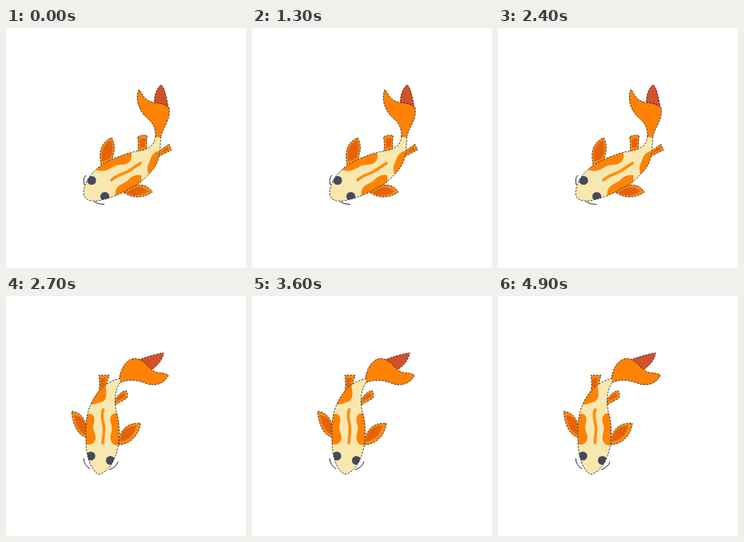
These frames come from a looping animation (300x300 px, 5 s). An HTML page:

```html
<!DOCTYPE html>
<html lang="en">
<head>
<meta charset="utf-8">
<title>Swimming koi</title>
<style>
  html, body { margin: 0; width: 100%; height: 100%; overflow: hidden; background: #fff; }
  svg { display: block; width: 100%; height: 100%; }
  .line, .lobe, .tail, .fin { stroke: #111; stroke-width: .8; stroke-dasharray: 2.4 1.6; }
  .line, .whisker { fill: none; }
  .whisker { stroke: #111; stroke-width: .9; }
  .body { fill: #f8e8b0; }
  .patch, .tail { fill: #ff8205; }
  .stripe { fill: none; stroke: #ff8c10; stroke-width: 3.6; stroke-linecap: round; }
  .lobe { fill: #d2522a; }
  .fin { fill: #fa8c14; }
  .inner { fill: #e56208; }
  .eye { fill: #474a5c; }
</style>
</head>
<body>
<svg viewBox="0 0 300 300">
  <defs>
    <path id="bodyLeft" d="M187 135C186 146 179 151 169 153C155 155 138 161 125 168C108 178 97 192 97 207C98 215 105 217 114 216C128 214 140 208 152 203C167 196 178 184 185 175C192 166 193 151 193.500 135"/>
    <path id="bodyDown" d="M143 103C128 106 115 116 107 133C100 148 99 163 100 181C100 199 105 217 116 223C128 220 136 207 140 189C143 172 141 154 138 145C135 132 136 119 142 109"/>
    <clipPath id="clipLeft"><use href="#bodyLeft"/></clipPath>
    <clipPath id="clipDown"><use href="#bodyDown"/></clipPath>
  </defs>

  <g id="left">
    <path class="lobe" d="M185.500 96C185 85 188 75 194 71C198 74 200 84 203 100"/>
    <path class="tail" d="M187 136C187 125 184 119 177 113C167 105 161 90 166 77C170 80 171 90 184 93C194 94 201 96 204 100C206 115 197 122 193.500 136"/>
    <path class="fin" d="M119 171C116 157 117 144 132 137C137 146 136 154 132 165"/>
    <path class="inner" d="M120.500 167C118 155 121 146 131 140C134 147 134 154 130 163Z"/>
    <path class="fin" d="M165 155Q166 145 164.500 136Q170 133 176.500 134.500Q175 144 176 153"/>
    <path class="inner" d="M167.500 150L167.500 139Q171 136.500 174.500 138L173.500 149Z"/>
    <path class="fin" d="M190 154Q198 150 203.500 145L207 152.500Q200 156 190 161"/>
    <path class="inner" d="M193 157Q196 152 202 148.500L203.500 152Q199 154 193 157Z"/>
    <use class="body" href="#bodyLeft"/>
    <g clip-path="url(#clipLeft)">
      <path class="patch" d="M112 177C122 181 128 177 135 173C143 169 155 174 157 161Q158 156 153 153L130 155Z"/>
      <path class="patch" d="M137 211C135 199 142 196 149 193C155 189 158 182 169 184L170 200Z"/>
      <path class="patch" d="M196 153C181 154 182 163 178 170Q175 177 179 185L192 180Z"/>
      <path class="patch" d="M185 132L196 132L196 136Q190 138 185 135Z"/>
      <circle class="eye" cx="107" cy="190.500" r="5.6"/>
      <circle class="eye" cx="123.500" cy="210.500" r="5.6"/>
    </g>
    <path class="stripe" d="M132 190C138 184 146 183 152 179.500C158 176 162 173 168 169"/>
    <use class="line" href="#bodyLeft"/>
    <path class="fin" d="M148 206C156 197 173 190 183 205C172 213 158 213 148 206"/>
    <path class="inner" d="M151 206C159 198 169 196 178 204C169 210 159 211 151 206Z"/>
    <path class="whisker" d="M98 196Q95.500 188 100 184M110 217Q115 220.500 123 220.500"/>
  </g>

  <g id="down">
    <path class="lobe" d="M165 80C176 76 186 73 197 71C196 79 190 87 182 92"/>
    <path class="tail" d="M141 109C142 93 149 79 161 78C175 79 178 94 191 96Q199 96 203 99C199 109 187 113 177 110C164 105 154 103 141 109"/>
    <path class="fin" d="M82 144C94 146 101 153 102 177C90 175 84 163 82 144"/>
    <path class="inner" d="M85 149C95 150 100 156 100 173C92 171 88 163 85 149Z"/>
    <path class="fin" d="M141 186C141 172 147 158 168 159C166 174 156 185 141 186"/>
    <path class="inner" d="M143 182C143 171 149 162 163 162C160 173 154 180 143 182Z"/>
    <path class="fin" d="M116 120Q118 109 116 99L129 99Q125 109 126 118"/>
    <path class="inner" d="M118 115L118 103L125 102L123 112Z"/>
    <path class="fin" d="M136 136Q136 123 150 118Q153 122 151 128Q143 132 137 136"/>
    <path class="inner" d="M138 132Q139 124 148 121L149 126Z"/>
    <use class="body" href="#bodyDown"/>
    <g clip-path="url(#clipDown)">
      <path class="patch" d="M104 136C112 136 116 133 121 132C127 129 126 118 124 111L109 115Z"/>
      <path class="patch" d="M97 150C108 143 112 150 110 159C107 167 112 171 112 178C110 187 104 186 97 185Z"/>
      <path class="patch" d="M143 147C132 144 129 151 131 159C135 167 129 173 131 180C133 187 138 187 144 186Z"/>
      <circle class="eye" cx="106" cy="200" r="5.6"/>
      <circle class="eye" cx="130.500" cy="205.500" r="5.6"/>
    </g>
    <path class="stripe" d="M121.500 142C118 152 122.500 158 122.500 166C122.500 173 121 178 121 184"/>
    <use class="line" href="#bodyDown"/>
    <path class="whisker" d="M97 203Q98 212 105 216M140 207Q138 214 129 217"/>
  </g>
</svg>
<script>
  const HALF_BEAT = 500;
  const poses = ["left", "down"].map(id => document.getElementById(id));

  function draw() {
    const current = Math.floor(performance.now() / HALF_BEAT) % poses.length;
    poses.forEach((pose, i) => pose.style.display = i === current ? "" : "none");
    requestAnimationFrame(draw);
  }
  draw();
</script>
</body>
</html>
```
